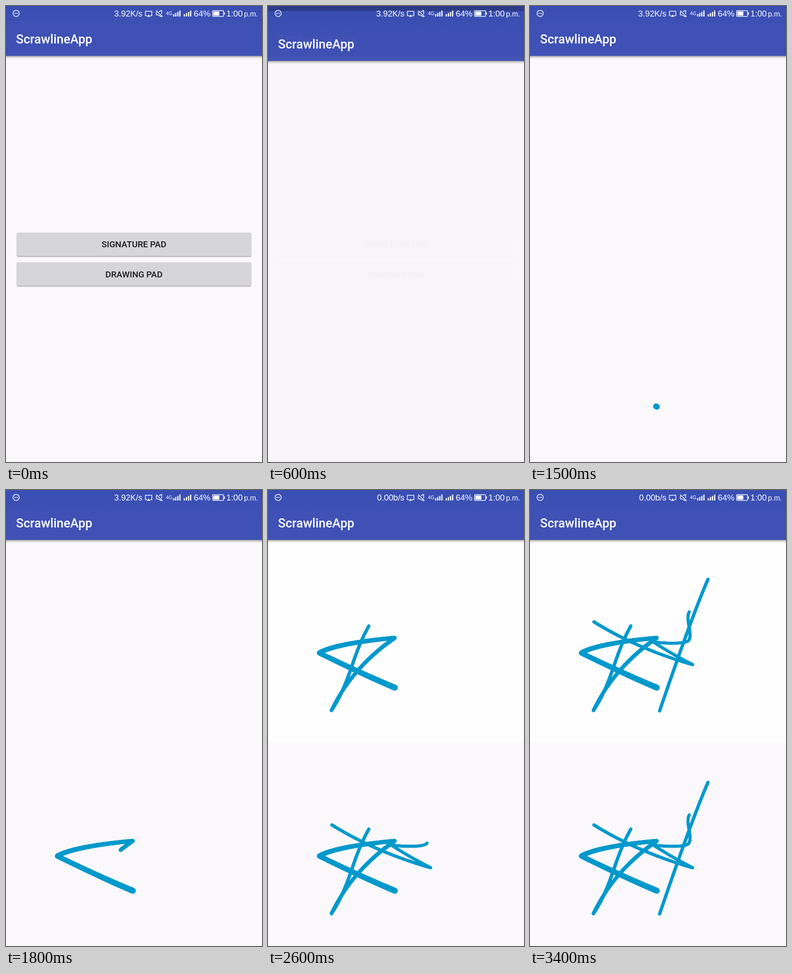
An HTML page for the animation above (4.8 s loop, 561 by 998 pixels).

```html
<!DOCTYPE html>
<html lang="en">
<head>
<meta charset="utf-8">
<title>Drawing pad demo</title>
<style>
  html, body { margin: 0; width: 100%; height: 100%; overflow: hidden; background: #000; }
  svg { display: block; width: 100vw; height: 100vh; }
  .ui { font-family: Roboto, sans-serif; font-weight: 500; }
  .status { font-family: "Liberation Sans", Arial, sans-serif; fill: #fff; }
  .icon { fill: none; stroke: #fff; stroke-width: 1.5; }
</style>
</head>
<body>
<svg viewBox="0 0 561 998" xmlns="http://www.w3.org/2000/svg">
  <defs>
    <linearGradient id="barFill" x1="0" y1="0" x2="0" y2="1">
      <stop offset="0" stop-color="#394eb3"/>
      <stop offset=".5" stop-color="#3f51b5"/>
    </linearGradient>
    <linearGradient id="barShade" x1="0" y1="0" x2="0" y2="1">
      <stop offset="0" stop-opacity=".42"/>
      <stop offset=".4" stop-opacity=".15"/>
      <stop offset="1" stop-opacity="0"/>
    </linearGradient>
    <filter id="lift" x="-5%" y="-20%" width="110%" height="150%">
      <feDropShadow dx="0" dy="1.6" stdDeviation="1.2" flood-opacity=".38"/>
    </filter>
    <clipPath id="buttonClip"><use href="#button" y="496"/></clipPath>
    <rect id="button" x="24" width="513" height="51" rx="2.5"/>
    <rect id="paper" width="561" height="998" fill="#faf8fb"/>
    <g id="header">
      <rect y="109" width="561" height="7" fill="url(#barShade)"/>
      <rect width="561" height="109" fill="url(#barFill)"/>
      <text class="ui" x="22" y="82" font-size="27.3" fill="#fff">ScrawlineApp</text>
    </g>
    <path id="bars" d="M1.3 23v-5m4.6 5v-7.5m4.6 7.5v-10m4.6 10v-13" stroke="#fff" stroke-width="2.6"/>
  </defs>

  <g id="home">
    <use href="#paper"/>
    <use href="#header"/>
    <g fill="#d6d5d8" filter="url(#lift)">
      <use href="#button" y="496"/>
      <use href="#button" y="561"/>
    </g>
    <g clip-path="url(#buttonClip)">
      <circle id="ripple" cx="350" cy="521" r="62" opacity=".1"/>
    </g>
    <g class="ui" font-size="19" fill="#19191c" text-anchor="middle">
      <text x="280.5" y="528">SIGNATURE PAD</text>
      <text x="280.5" y="593.5">DRAWING PAD</text>
    </g>
  </g>
  <rect id="veil" width="561" height="998"/>

  <g id="pad">
    <use href="#paper"/>
    <rect id="preview" y="109" width="561" height="444.5" fill="#fefefe"/>
    <g stroke="#0099cc" stroke-linecap="round">
      <g id="ink"></g>
      <g id="inkCopy" transform="translate(0 -444.5)"></g>
    </g>
    <use href="#header"/>
  </g>

  <g class="status" font-size="18.3">
    <circle class="icon" cx="22.2" cy="16.2" r="6.8"/>
    <path d="M18.3 16.2h7.9" stroke="#fff" stroke-width="1.9" stroke-dasharray="1.9 1.1"/>
    <text id="speed" x="299" y="23" text-anchor="end"></text>
    <path class="icon" d="M309 21.3H305.5V11.5H319.5V21.3H316"/>
    <path d="M312.5 18.8l4 4.6h-8z"/>
    <path class="icon" d="M329 10L343 23.5M331 13.5H329.5V19.5H333L340.5 23.5V20M335 12.5L341 9.5V18"/>
    <text x="350.5" y="20" font-size="10.5">4G</text>
    <use href="#bars" x="366"/>
    <use href="#bars" x="389.5"/>
    <text x="411.5" y="23">64%</text>
    <rect class="icon" x="452.7" y="10.2" width="24" height="12.6" rx="1"/>
    <path d="M454.5 12h13v9h-13zM477.5 14h2v5h-2z"/>
    <text x="483" y="23">1:00 <tspan x="521.5" font-size="15.8">p.m.</tspan></text>
  </g>
</svg>
<script>
const LOOP = 4800, STEP = 100, DAB = 2;
const $ = id => document.getElementById(id);

// The pen runs along each path at constant speed, thinning from one width to the other.
const strokes = [
  { start: 1500, duration: 600, from: 13, to: 7,
    d: "M278 877Q215 851 112 801Q150 780 278 768Q185 832 139 927C182 862 182 812 221 742" },
  { start: 2180, duration: 485, from: 7, to: 6.5,
    d: "M140 733Q235 792 357 827Q310 803 270 777C300 781 349 782 349 771C356 757 340 728 349 711" },
  { start: 2850, duration: 100, from: 7, to: 7,
    d: "M390 640Q355 720 284 928" }
];

for (const s of strokes) {
  s.path = document.createElementNS("http://www.w3.org/2000/svg", "path");
  s.path.setAttribute("d", s.d);
  s.length = s.path.getTotalLength();
}

const clamp = v => Math.max(0, Math.min(1, v));
const progress = (s, t) => (t - s.start) / s.duration;

function inkOf(s, part) {
  if (part < 0) return "";
  const reach = s.length * Math.min(1, part);
  let svg = "";
  for (let at = 0; at <= reach; at += DAB) {
    const a = s.path.getPointAtLength(at);
    const b = s.path.getPointAtLength(Math.min(at + DAB, s.length));
    const width = s.to + (s.from - s.to) * (1 - at / s.length) ** 1.7;
    svg += `<line x1="${a.x}" y1="${a.y}" x2="${b.x}" y2="${b.y}" stroke-width="${width}"/>`;
  }
  return svg;
}

const show = (id, on) => $(id).setAttribute("display", on ? "inline" : "none");

function render(t) {
  // The pad screen slides up and fades in over the dimming home screen.
  const since = t - 485;
  const slide = Math.round(80 * (1 - clamp(since / 350)) ** 5);
  show("home", t < 900);
  show("ripple", t >= 400);
  show("pad", since > 0);
  $("veil").setAttribute("opacity", 0.3 * clamp(since / 140));
  $("pad").setAttribute("opacity", 1 - (1 - clamp(since / 200)) ** 4);
  $("pad").setAttribute("transform", `translate(0 ${slide})`);

  // The preview receives each stroke once the pen lifts.
  const finished = strokes.filter(s => progress(s, t) >= 1);
  show("preview", finished.length > 0);
  $("ink").innerHTML = strokes.map(s => inkOf(s, progress(s, t))).join("");
  $("inkCopy").innerHTML = finished.map(s => inkOf(s, 1)).join("");
  $("speed").textContent = t < 2100 ? "3.92K/s" : "0.00b/s";
}

const origin = performance.now();
let shown = -1;
function tick() {
  const t = Math.floor((performance.now() - origin) % LOOP / STEP) * STEP;
  if (t !== shown) render(shown = t);
  requestAnimationFrame(tick);
}
tick();
</script>
</body>
</html>
```
